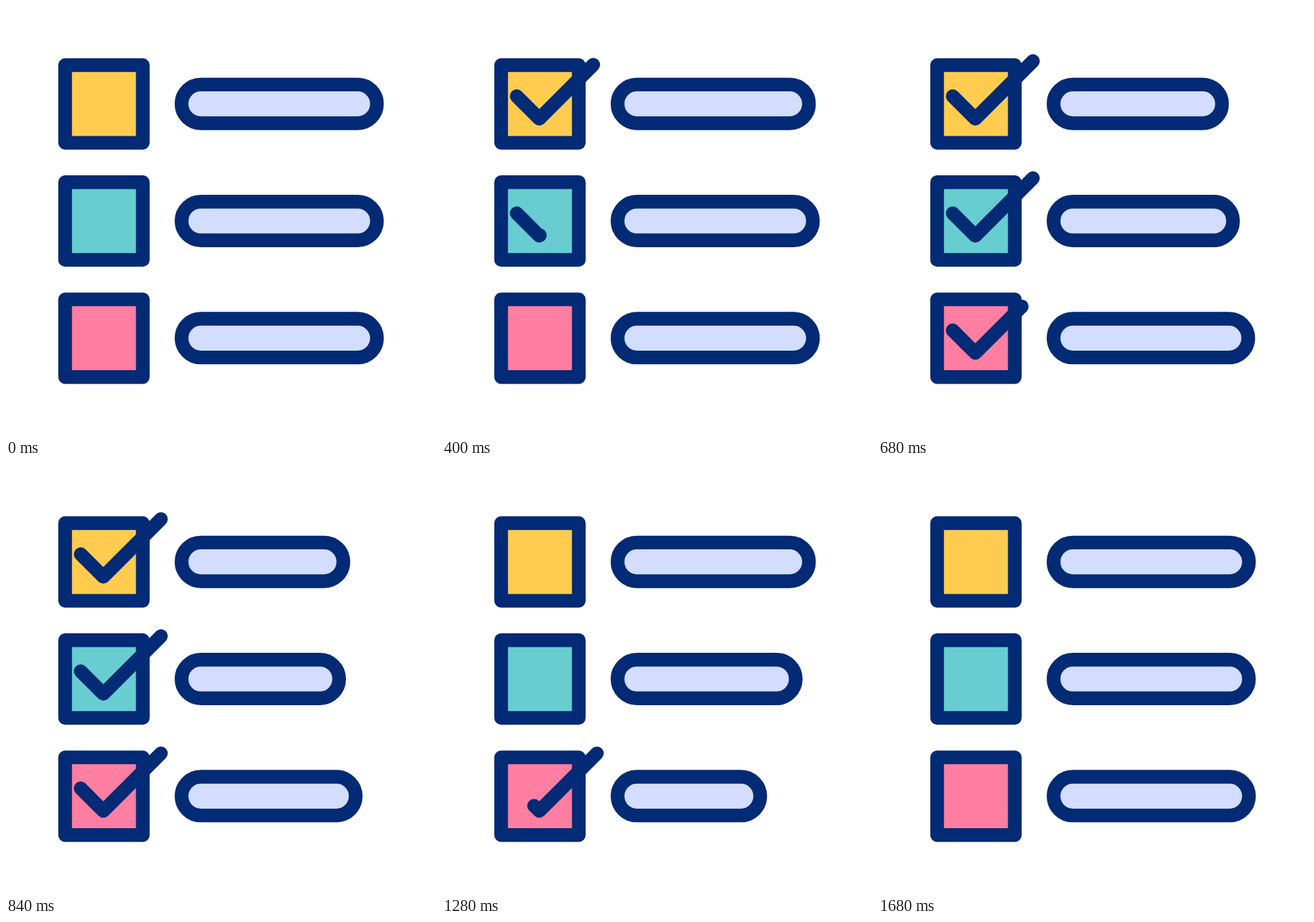
These frames come from a looping animation (640 px wide and 640 px high, 2000 ms). An HTML page:

```html
<!DOCTYPE html>
<html lang="en">
<head>
<meta charset="utf-8">
<title>Checklist</title>
<style>
  html, body { margin: 0; width: 100%; height: 100%; overflow: hidden; background: #fff; }
  svg { display: block; width: 100vw; height: 100vh; }
</style>
</head>
<body>
<svg id="stage" viewBox="0 0 640 640" stroke="#032a74" stroke-width="20.4"
     stroke-linecap="round" stroke-linejoin="round"></svg>
<script>
const LOOP = 2000, STEP = 40, ROW_GAP = 174.3;
const BAR_WIDTH = 290.8;
const CHECK = [[111.2, 134.2], [144.8, 167.8], [230.6, 82]];
const DRAW = { start: 200, length: 255 };
const ERASE = { start: 853, length: 230 };
const STAGGER = 160;

// bar: start, narrowest and end times; shrink: how far it narrows
const rows = [
  { fill: '#ffcc50', bar: [280, 840, 1400], shrink: 50 },
  { fill: '#67cdd1', bar: [488, 980, 1488], shrink: 70 },
  { fill: '#ff7ea1', bar: [650, 1140, 1675], shrink: 94.5 }
];

const stage = document.getElementById('stage');
const ramp = (t, a, b) => Math.min(1, Math.max(0, (t - a) / (b - a)));
const smooth = u => u * u * (3 - 2 * u);
const easeIn = u => u * u;
const easeOut = u => 1 - (1 - u) * (1 - u);

function add(parent, tag, attrs) {
  const el = document.createElementNS('http://www.w3.org/2000/svg', tag);
  for (const key in attrs) el.setAttribute(key, attrs[key]);
  return parent.appendChild(el);
}

rows.forEach((row, i) => {
  const g = add(stage, 'g', { transform: `translate(0 ${i * ROW_GAP})` });
  add(g, 'rect', { x: 88, y: 88, width: 115.6, height: 115.6, fill: row.fill });
  row.barEl = add(g, 'rect', { x: 261.3, y: 116.9, height: 57.6, rx: 28.8, fill: '#d3ddff' });
  row.checkEl = add(g, 'path', { fill: 'none' });
});

const dist = (p, q) => Math.hypot(q[0] - p[0], q[1] - p[1]);
const SPLIT = dist(CHECK[0], CHECK[1]) / (dist(CHECK[0], CHECK[1]) + dist(CHECK[1], CHECK[2]));

function pointAt(f) {
  const k = f < SPLIT ? 0 : 1;
  const u = k ? (f - SPLIT) / (1 - SPLIT) : f / SPLIT;
  return CHECK[k].map((v, i) => v + (CHECK[k + 1][i] - v) * u);
}

// Path of the check mark between two fractions of its length
function checkPath(from, to) {
  if (to <= from) return '';
  const points = [pointAt(from)];
  if (from < SPLIT && to > SPLIT) points.push(CHECK[1]);
  points.push(pointAt(to));
  return 'M' + points.map(p => p.map(v => v.toFixed(2)).join(' ')).join('L');
}

function phase(span, t) {
  return ramp(t, span.start, span.start + span.length);
}

function render(t) {
  rows.forEach((row, i) => {
    const [start, mid, end] = row.bar;
    const narrow = smooth(ramp(t, start, mid)) - smooth(ramp(t, mid, end));
    row.barEl.setAttribute('width', BAR_WIDTH - row.shrink * narrow);
    const local = t - i * STAGGER;
    row.checkEl.setAttribute('d', checkPath(easeIn(phase(ERASE, local)), easeOut(phase(DRAW, local))));
  });
}

let origin = null;
function tick(now) {
  if (origin === null) origin = now;
  const t = (now - origin) % LOOP;
  render(Math.floor(t / STEP + 1e-6) * STEP);
  requestAnimationFrame(tick);
}
render(0);
requestAnimationFrame(tick);
</script>
</body>
</html>
```
